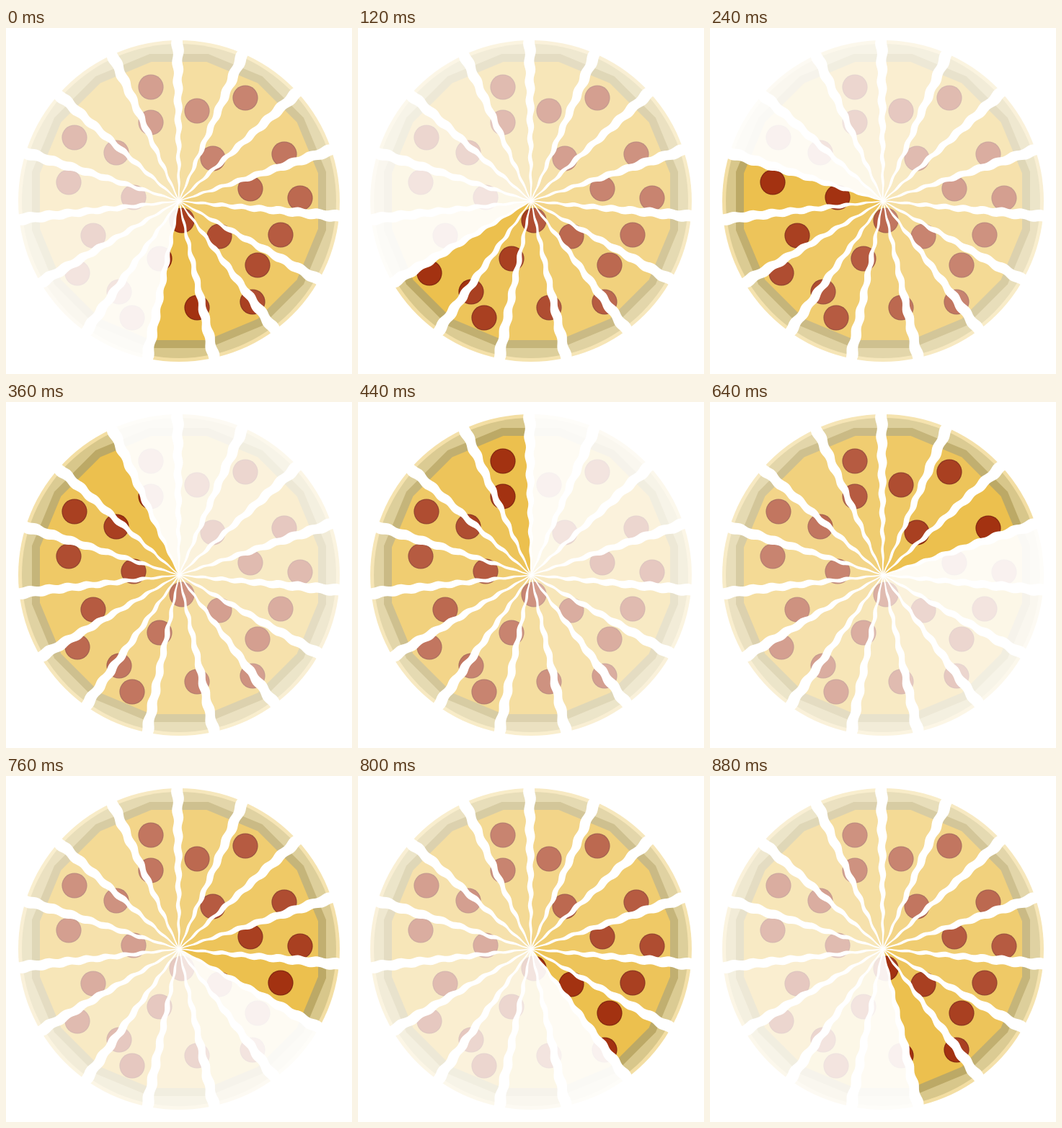
An HTML page with a canvas that plays this animation: 480x480 px, repeating every 960 ms.

```html
<!DOCTYPE html>
<html lang="en">
<head>
<meta charset="utf-8">
<title>Pizza spinner</title>
<style>
  html, body { margin: 0; width: 100%; height: 100%; overflow: hidden; background: #fff; }
  canvas { display: block; }
</style>
</head>
<body>
<canvas id="stage" width="480" height="480"></canvas>
<script>
const ctx = document.getElementById('stage').getContext('2d');
const TAU = Math.PI * 2;
const SLICES = 15, STEP = TAU / SLICES, START = -90.5 * Math.PI / 180;
const LOOP = 960, TICK = 40;
const RADIUS = 223;

const toppings = [
  [201, 82], [201, 131], [265, 115], [332, 97], [287, 181], [386, 175],
  [339, 223], [408, 236], [381, 287], [296, 289], [349, 329], [342, 380],
  [265, 388], [244, 267], [213, 320], [175, 402], [157, 366], [99, 340],
  [121, 288], [177, 235], [87, 214], [95, 152], [153, 173]
];

function disc(x, y, r, color) {
  ctx.fillStyle = color;
  ctx.beginPath();
  ctx.arc(x, y, r, 0, TAU);
  ctx.fill();
}

// Regular 16-gon with flat sides at the top, bottom, left and right.
function facets(apothem, color) {
  const r = apothem / Math.cos(TAU / 32);
  ctx.fillStyle = color;
  ctx.beginPath();
  for (let i = 0; i < 16; i++) {
    const a = (i + 0.5) * TAU / 16;
    ctx.lineTo(r * Math.cos(a), r * Math.sin(a));
  }
  ctx.fill();
}

function drawPizza() {
  disc(0, 0, RADIUS, '#f3dea3');
  disc(0, 0, 218, '#d8c78b');
  facets(204, '#bca966');
  facets(193, '#ecc04e');
  for (const [x, y] of toppings) {
    disc(x - 240, y - 240, 17.6, '#852a12');
    disc(x - 240, y - 240, 16.3, '#a33211');
  }
}

function fadeSlice(index, alpha) {
  const a = START + index * STEP;
  ctx.fillStyle = `rgba(255, 255, 255, ${alpha})`;
  ctx.beginPath();
  ctx.moveTo(0, 0);
  ctx.arc(0, 0, RADIUS + 2, a, a + STEP);
  ctx.fill();
}

// Wavy white cut that widens towards the rim.
function drawCut(index) {
  const edge = (r, phase) => 0.6 + r * 0.0335 + Math.min(1.1, r * 0.02) * Math.sin(r / 4.2 + phase);
  ctx.save();
  ctx.rotate(START + index * STEP);
  ctx.fillStyle = '#fff';
  ctx.beginPath();
  for (let r = 0; r <= 228; r += 3) ctx.lineTo(r, -edge(r, 0));
  for (let r = 228; r >= 0; r -= 3) ctx.lineTo(r, edge(r, 2.2));
  ctx.fill();
  ctx.restore();
}

function draw(now) {
  const time = Math.floor(now % LOOP / TICK) * TICK;
  const head = 7 + Math.floor((time + TICK - 1) * SLICES / LOOP);
  ctx.setTransform(1, 0, 0, 1, 0, 0);
  ctx.fillStyle = '#fff';
  ctx.fillRect(0, 0, 480, 480);
  ctx.translate(240, 240);
  drawPizza();
  for (let age = 1; age < SLICES; age++) fadeSlice(head - age, age / SLICES);
  for (let i = 0; i < SLICES; i++) drawCut(i);
}

const begin = performance.now();
function loop() {
  draw(performance.now() - begin);
  requestAnimationFrame(loop);
}
loop();
</script>
</body>
</html>
```
